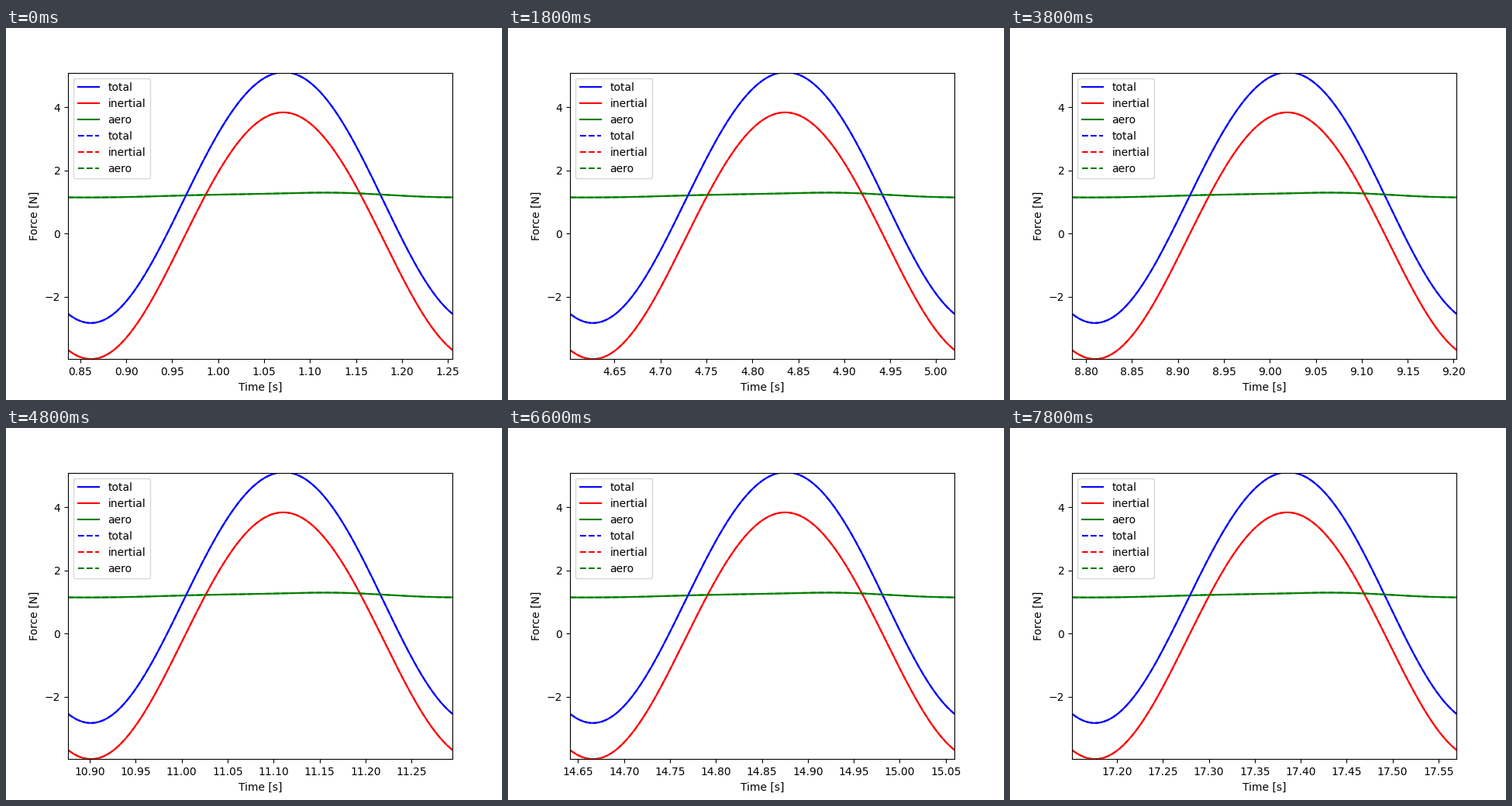
Write a matplotlib script that moves like this. It is 640 px wide and 480 px high and loops after 8 s.

```python
import numpy as np
import matplotlib.pyplot as plt
from matplotlib.animation import FuncAnimation

PERIOD = 0.41832   # length of one cycle in seconds
FRAMES = 40
COLORS = {"total": "b", "inertial": "r", "aero": "g"}

# Cosine and sine weights of the aerodynamic force, by harmonic
AERO_MEAN = 1.2168
AERO = [(-0.0589, -0.0405), (-0.0155, 0.005), (0.0034, 0.003)]


def inertial_force(u):
    theta = 2 * np.pi * (u - 0.0597)
    return -3.91 * np.cos(theta) - 0.07 * np.cos(2 * theta)


def aero_force(u):
    force = np.full_like(u, AERO_MEAN)
    for k, (a, b) in enumerate(AERO, 1):
        phi = 2 * np.pi * k * u
        force += a * np.cos(phi) + b * np.sin(phi)
    return force


phase = np.linspace(0, 1, 201)
inertial, aero = inertial_force(phase), aero_force(phase)
forces = {"total": inertial + aero, "inertial": inertial, "aero": aero}

fig, ax = plt.subplots(figsize=(6.4, 4.8), dpi=100)
lines = []
for style in ("-", "--"):
    for name, force in forces.items():
        line, = ax.plot(phase, force, COLORS[name] + style, label=name)
        lines.append(line)

ax.set_ylim(-3.98, 5.1)
ax.set_xlabel("Time [s]")
ax.set_ylabel("Force [N]")
ax.legend(loc="upper left")


def update(frame):
    start = (frame + 2) * PERIOD
    for line in lines:
        line.set_xdata(start + phase * PERIOD)
    ax.set_xlim(start, start + PERIOD)
    return lines


anim = FuncAnimation(fig, update, frames=FRAMES, interval=200,
                     repeat=True, repeat_delay=0, blit=False)
plt.show()
```
